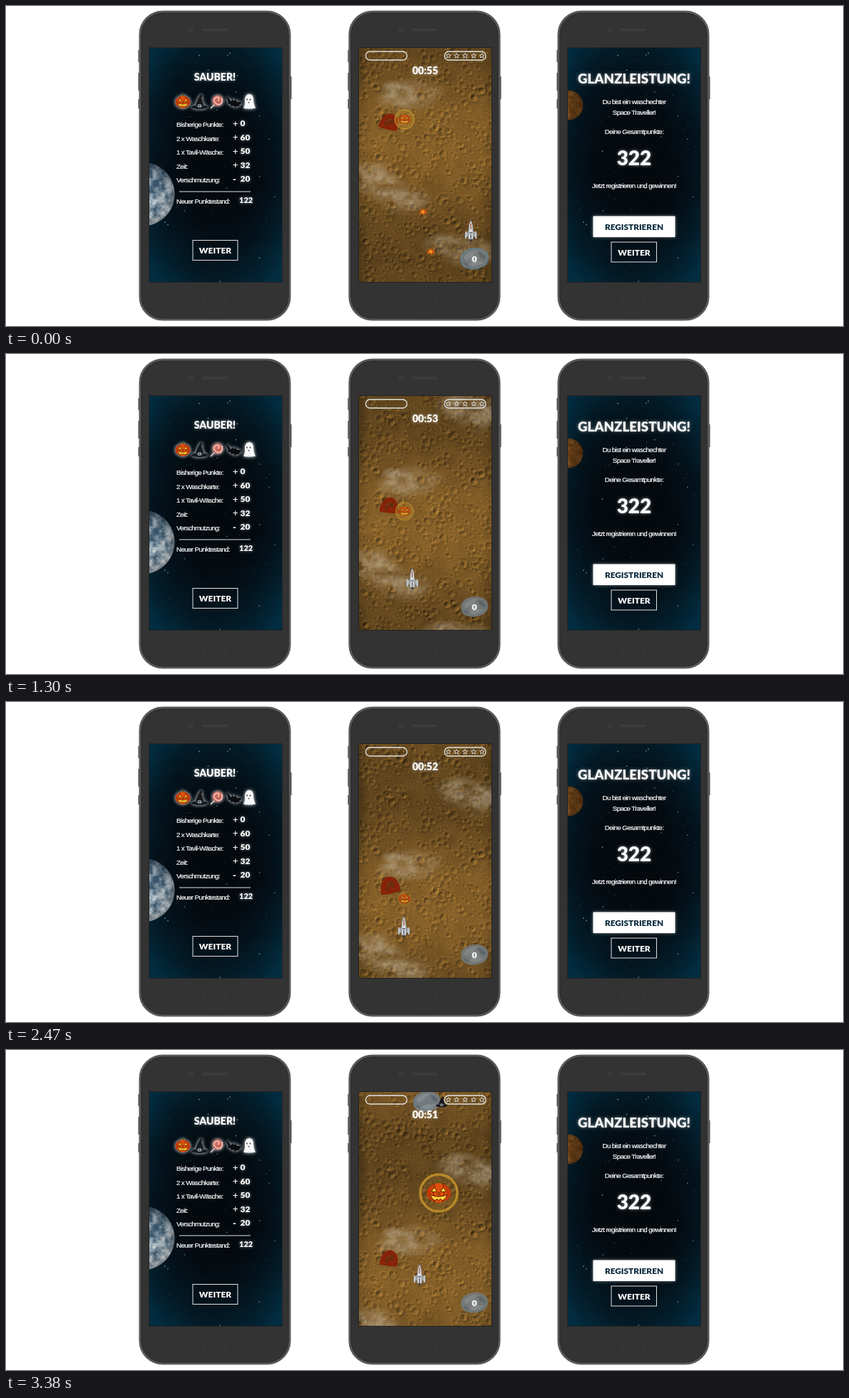
These frames come from a looping animation (1174 px wide and 450 px high, 3510 ms). An HTML page with a canvas:

```html
<!DOCTYPE html>
<html lang="de">
<head>
<meta charset="utf-8">
<title>Weltraumspiel</title>
<style>
html, body { margin: 0; width: 100%; height: 100%; overflow: hidden; background: #fff; }
#stage { position: relative; width: 1174px; height: 450px; overflow: hidden; }
#stage > svg, #stage canvas, .screen { position: absolute; left: 0; top: 0; }
#stage .screen { top: 59px; width: 186px; height: 329px; overflow: hidden; background: #04141f; }
.head { font-family: Lato, "Open Sans", sans-serif; font-weight: 900; fill: #fff; }
.copy { font-family: "Liberation Sans", Arial, sans-serif; font-size: 9.8px; letter-spacing: -.65px; fill: #fff; stroke: #fff; stroke-width: .2px; }
.mid { text-anchor: middle; }
.glow { filter: drop-shadow(0 0 2px rgba(255,255,255,.5)); }
.line { fill: none; stroke: #dfe3e2; }
</style>
</head>
<body>
<div id="stage">
  <svg width="1174" height="450">
    <defs>
      <g id="phone">
        <path d="M187 62v17M187 94v25M187 131v13M399 99v32" stroke="#4a4a4c" stroke-width="3"/>
        <rect x="188" y="8" width="210" height="433" rx="32" fill="#333" stroke="#58585a" stroke-width="3"/>
        <rect x="190" y="10" width="206" height="429" rx="30" fill="none" stroke="#2b2b2b"/>
        <path d="M276 32.5h35M277 34.5h34" stroke="#5a5a5a" stroke-dasharray="1 1.5"/>
        <circle cx="259.500" cy="33.500" r="2.500" fill="none" stroke="#575757" stroke-dasharray="1 1"/>
        <circle cx="293" cy="414.500" r="16" fill="none" stroke="#4c4c4c" stroke-dasharray="1 2"/>
        <rect x="200" y="58" width="188" height="331" fill="#232323"/>
      </g>
    </defs>
    <use href="#phone"/><use href="#phone" x="294"/><use href="#phone" x="587"/>
  </svg>

  <div class="screen" style="left:201px"><canvas id="skyA"></canvas><canvas id="moon"></canvas></div>
  <div class="screen" style="left:495px"><canvas id="ground"></canvas><canvas id="clouds"></canvas><canvas id="newCloud"></canvas></div>
  <div class="screen" style="left:788px"><canvas id="skyB"></canvas><canvas id="planet"></canvas></div>

  <svg width="1174" height="450">
    <defs>
      <clipPath id="view"><rect x="495" y="59" width="186" height="329"/></clipPath>
      <g id="pumpkin">
        <path d="M-1.500-7.500L-1-10.500L2-10L1.500-7z" fill="#4d5a16"/>
        <ellipse rx="10.500" ry="8.500" fill="#c23a0a"/>
        <ellipse rx="7" ry="8.700" fill="#dc4f0c"/>
        <path d="M-3.500-8Q-6 0-3.500 8M3.500-8Q6 0 3.500 8" fill="none" stroke="#8c2404" stroke-width=".8"/>
        <path d="M-6.500-1L-4-5L-1.500-1zM6.500-1L4-5L1.500-1zM-1 1.500L0-.5L1 1.500zM-7.500 1.500Q0 5 7.500 1.500Q5 7 2.500 6.500L1.500 5L0 6.800L-1.500 5L-2.500 6.500Q-5 7-7.500 1.500z" fill="#ffd83c" stroke="#5a1402" stroke-width=".6"/>
      </g>
      <g id="hat" fill="#15191c">
        <ellipse cy="7" rx="11" ry="3"/>
        <path d="M-6.500 6.500L-2-5L2-11L4.500-8L2.500-6.500L6.500 6.500Q0 9-6.500 6.500z"/>
        <path d="M-5.500 3.500Q0 6 5.500 3.500V6Q0 8.500-5.500 6z" fill="#343a3f"/>
        <rect x="-1.700" y="4" width="3.500" height="3" fill="none" stroke="#c7ccd0"/>
      </g>
      <g id="rock">
        <path d="M-19 2Q-19-7-11-11Q-2-16 9-13Q19-10 19-1Q19 9 10 12Q-1 17-11 13Q-18 11-19 2z" fill="#727a7e"/>
        <path d="M-15-2Q-8-12 5-11Q-2-3-12 3zM-8 8Q3 2 13 5Q6 12-4 11z" fill="#949c9f" opacity=".5"/>
        <path d="M5-9Q15-7 16 0Q12 2 8-2zM-16 5Q-10 6-8 10Q-13 11-16 5z" fill="#4e5b66" opacity=".6"/>
      </g>
      <g id="leaf">
        <path d="M-6-1L-3-2L-4-5L-1-3L1-6L2-3L6-4L4 0L6 2L2 2L1 5L-1 2L-5 4L-4 1z" fill="#cf5a10"/>
        <path d="M-3-1L0-3L2 0L0 2z" fill="#f2a227"/>
      </g>
      <path id="star" class="line" stroke-width=".9" d="M0-3.500L1-1.200L3.400-1.100L1.600.5L2.200 2.900L0 1.600L-2.200 2.900L-1.600.5L-3.400-1.100L-1-1.200z"/>
    </defs>

    <!-- score screen -->
    <text class="head mid glow" x="293" y="105" font-size="14">SAUBER!</text>
    <g class="glow">
      <g class="glow">
        <use href="#pumpkin" x="248" y="135"/>
        <use href="#hat" x="271.500" y="135"/>
        <g transform="translate(297 133)">
          <path d="M-2 3L-10 11" stroke="#e5ddd7" stroke-width="1.500"/>
          <circle r="7.500" fill="#c9665d"/>
          <path d="M0 0Q4-3 0-5Q-6-4-5 1Q-2 7 4 5Q8 0 5-4" fill="none" stroke="#f3c9b9" stroke-width="1.600"/>
        </g>
        <path d="M309 128Q313 129 315 134L318 131L319 133L321 133L322 131L324 135Q327 134 331 136Q327 138 327 141Q323 140 322 143Q319 139 316 141Q315 137 312 138Q312 133 309 128z" fill="#0b0d10"/>
        <path d="M333 144Q336 138 335 132Q336 124 341 124Q347 124 347 132Q347 138 350 144Q346 143 345 145Q343 143 341 145Q339 143 337 145Q336 143 333 144z" fill="#f5f7f8"/>
        <path d="M338 130.500v2M342.500 130.500v2M340.500 135v1.500" stroke="#30383d" stroke-width="1.500"/>
      </g>
    </g>
    <g id="scores"></g>
    <path d="M243 261h100" stroke="#dfe6e8" stroke-width="1.200"/>
    <rect class="line" x="262" y="329.500" width="63" height="28"/>
    <text class="head mid" x="293.500" y="348" font-size="12">WEITER</text>

    <!-- game screen -->
    <g clip-path="url(#view)">
      <g id="stain">
        <path d="M-13 11Q-13 2-9-5Q-5-11 1-11Q8-10 11-4Q14 3 13 11Q0 13-13 11z" fill="#862208"/>
        <path d="M-3-3Q2-7 6-3L7 2L4 5L2 2L-2 4L-3 9L-6 6z" fill="#5c3212" opacity=".8"/>
        <path d="M-2-3h5M-4 0h3M2 6h5M-9 8h4" stroke="#9c3412" stroke-width="1.200"/>
      </g>
      <use id="leafA" href="#leaf"/><use id="leafB" href="#leaf"/>
      <g id="ship">
        <path d="M-2.500 11L0 16L2.500 11z" fill="#30343a"/>
        <path d="M-2.500-1L-8.500 5V10L-2.500 8zM2.500-1L8.500 5V10L2.500 8z" fill="#a9adae" stroke="#55595d" stroke-width=".7"/>
        <path d="M-7 1V11M7 1V11" stroke="#c9cccc" stroke-width="1.800"/>
        <path d="M0-15Q3.500-9 3.200 1L3.500 12H-3.500L-3.200 1Q-3.500-9 0-15z" fill="#d8dada" stroke="#63676b" stroke-width=".7"/>
        <path d="M0-10V-2" stroke="#a8513f" stroke-width="1.300"/>
        <path d="M-2 3H2M0 5V11" stroke="#545b62" stroke-width="1.400"/>
      </g>
      <g id="bonus">
        <circle id="ring" fill="#d9a733" stroke="#d29c2c"/>
        <use id="treat" href="#pumpkin"/>
      </g>
      <g id="arrival"><use href="#rock" x="590"/><use href="#hat" transform="translate(611 1) scale(.75)"/></g>
      <use href="#rock" x="657" y="355" opacity=".9"/>
      <path id="aura" d="M638 357Q638 348 646 344Q655 339 666 342Q676 345 676 354Q676 364 667 367Q656 372 646 368Q639 366 638 357z" fill="none" stroke="#4d8fb5" stroke-width="1.300" stroke-dasharray="2 1"/>
      <text class="head mid glow" x="657" y="360" font-size="12">0</text>
      <rect class="line" x="504.500" y="64" width="58" height="12" rx="6" stroke-width="1.300"/>
      <rect class="line" x="615" y="64" width="58" height="12" rx="6" stroke-width="1.300"/>
      <use href="#star" x="620.500" y="70"/><use href="#star" x="632" y="70"/><use href="#star" x="644" y="70"/><use href="#star" x="656" y="70"/><use href="#star" x="667.500" y="70"/>
      <text id="clock" class="head mid glow" x="588" y="95.500" font-size="14"></text>
    </g>

    <!-- result screen -->
    <text class="head mid glow" x="881" y="109" font-size="18.700">GLANZLEISTUNG!</text>
    <g class="copy mid">
      <text x="881" y="138">Du bist ein waschechter</text>
      <text x="881" y="153">Space Traveller!</text>
      <text x="881" y="180">Deine Gesamtpunkte:</text>
      <text x="881" y="256">Jetzt registrieren und gewinnen!</text>
    </g>
    <text class="head mid glow" x="881" y="224" font-size="28">322</text>
    <rect class="glow" x="823.500" y="295.500" width="115" height="29.500" fill="#fff"/>
    <text class="head mid" x="881" y="314.500" font-size="11.800" style="fill:#0b2a3d">REGISTRIEREN</text>
    <rect class="line" x="849" y="332" width="63.500" height="28"/>
    <text class="head mid" x="881" y="351" font-size="12">WEITER</text>
  </svg>
</div>

<script>
const $ = id => document.getElementById(id);
const clamp = (v, a = 0, b = 1) => Math.min(b, Math.max(a, v));
const mix = (a, b, k) => a + (b - a) * k;

const hash = (x, y) => {
  const v = Math.sin(x * 127.1 + y * 311.7) * 43758.5453;
  return v - Math.floor(v);
};
function noise(x, y) {
  const i = Math.floor(x), j = Math.floor(y);
  const ease = f => f * f * (3 - 2 * f);
  const u = ease(x - i), v = ease(y - j);
  return mix(mix(hash(i, j), hash(i + 1, j), u), mix(hash(i, j + 1), hash(i + 1, j + 1), u), v);
}
const cloudy = (x, y) => .5 * noise(x, y) + .3 * noise(x * 2.1, y * 2.1) + .2 * noise(x * 4.3, y * 4.3);

function random(seed) {
  return () => (seed = (seed * 16807) % 2147483647) / 2147483647;
}

// Fill a canvas pixel by pixel with shade(x, y) -> [r, g, b, alpha]
function paint(id, w, h, shade) {
  const c = $(id), g = c.getContext("2d");
  c.width = w; c.height = h;
  const img = g.createImageData(w, h);
  for (let y = 0, p = 0; y < h; y++)
    for (let x = 0; x < w; x++, p += 4) {
      const [r, gr, b, a = 1] = shade(x, y);
      img.data.set([r, gr, b, a * 255], p);
    }
  g.putImageData(img, 0, 0);
  return g;
}

const W = 186, H = 329, DROP = 150, RISE = 70;

function sky(id) {
  const g = paint(id, W, H, (x, y) => {
    const d = Math.hypot((x - 93) / 125, (y - 160) / 205);
    const k = clamp(d ** 3 * .95 + .2 * (cloudy(x / 40, y / 40) - .5));
    return [mix(4, 2, k), mix(9, 44, k), mix(14, 64, k)];
  });
  const rnd = random(77);
  for (let i = 0; i < 170; i++) {
    const bright = rnd() ** 5, s = bright > .6 ? 1.5 : 1;
    g.fillStyle = `rgba(150,195,215,${.12 + .65 * bright})`;
    g.fillRect(rnd() * W, rnd() * H, s, s);
  }
}

// tilt brightens the lower right rim
function globe(id, cx, cy, r, dark, light, size, tilt) {
  paint(id, 60, 260, (x, y) => {
    const dx = x - cx, dy = y - cy, d = Math.hypot(dx, dy);
    const grain = (cloudy(x / size + 5, y / size) - .5) * 1.6;
    const n = clamp(.3 + grain + tilt * (dy * .8 + dx * .4) / r);
    const limb = .6 + .45 * Math.sqrt(clamp(1 - d * d / r / r));
    return [0, 1, 2].map(i => mix(dark[i], light[i], n) * limb).concat(clamp(r + .5 - d));
  });
}

function ground() {
  const h = H + DROP, map = new Float32Array(W * h), rnd = random(4321);
  for (let i = 0; i < 1500; i++) {
    const cx = rnd() * W, cy = rnd() * h, r = 1.5 + 4 * rnd() ** 2, m = r * 1.6;
    for (let y = Math.max(0, Math.ceil(cy - m)); y < Math.min(h, cy + m); y++)
      for (let x = Math.max(0, Math.ceil(cx - m)); x < Math.min(W, cx + m); x++) {
        const d = Math.hypot(x - cx, y - cy) / r;
        map[y * W + x] += r * (.25 * Math.exp(-(((d - 1) / .35) ** 2)) - .35 * Math.max(0, 1 - d * d));
      }
  }
  const at = (x, y) => map[clamp(y, 0, h - 1) * W + clamp(x, 0, W - 1)];
  paint("ground", W, h, (x, y) => {
    const slope = at(x + 1, y + 1) - at(x - 1, y - 1);
    const band = .17 * Math.cos((y - DROP - 131) / H * 2 * Math.PI);
    const edge = -.16 * clamp(1 - Math.min(x, W - x) / 14);
    const v = clamp(1 + .1 * slope + band + edge + .22 * (cloudy(x / 16, y / 16) - .5)
      + .12 * (hash(x, y) - .5), .45, 1.5);
    return [114 * v, 82 * v, 35 * v];
  });
}

// Puffs are [x, y, rx, ry]
function clouds(id, puffs) {
  paint(id, W, H + RISE, (x, y) => {
    let body = 0;
    for (const [cx, cy, rx, ry] of puffs)
      body = Math.max(body, 1 - Math.hypot((x - cx) / rx, (y - RISE - cy) / ry));
    const a = body <= 0 ? 0 : clamp(body * 1.7) * clamp((cloudy(x / 15, y / 12) - .15) * 1.6);
    return [190, 175, 150, a * .62];
  });
}

function scores() {
  const rows = [
    ["Bisherige Punkte:", "+", "0", 170], ["2 x Waschkarte:", "+", "60", 189.5],
    ["1 x Tavil-Wäsche:", "+", "50", 209], ["Zeit:", "+", "32", 228.5],
    ["Verschmutzung:", "-", "20", 248], ["Neuer Punktestand:", "", "122", 277.5]
  ];
  $("scores").innerHTML = rows.map(([label, sign, n, y]) => `
    <text class="copy" x="239" y="${y}">${label}</text>
    <text class="${sign === "-" ? "head" : "copy"}" x="318" y="${y - .5}" style="font-size:13px">${sign}</text>
    <text class="head glow" x="${sign ? 328.5 : 327}" y="${y - 1}" font-size="${sign ? 12 : 11}">${n}</text>`).join("");
}

// Straight-line interpolation through [time, ...values]
function along(keys, t) {
  let i = 0;
  while (i < keys.length - 2 && t >= keys[i + 1][0]) i++;
  const a = keys[i], b = keys[i + 1], k = clamp((t - a[0]) / (b[0] - a[0]));
  return a.slice(1).map((v, n) => mix(v, b[n + 1], k));
}
const place = (id, x, y, s = 1, rot = 0) =>
  $(id).setAttribute("transform", `translate(${x} ${y}) rotate(${rot}) scale(${s})`);
const show = (id, on) => $(id).style.display = on ? "" : "none";

const LOOP = 3510, STEP = 130, CAUGHT = 2990;
const shipPath = [[0, 652], [390, 632], [910, 586], [1560, 559], [2470, 558], [3120, 575.5], [3380, 580]];
const flight = [[CAUGHT, 562, 301, 1.15], [3120, 572, 297, 1.5], [3250, 590, 250, 1.55], [3380, 607, 201, 1.6]];

function render(t) {
  $("ground").style.top = -DROP + t * .0385 + "px";
  $("clouds").style.top = $("newCloud").style.top = -RISE + t * .0425 + "px";
  show("newCloud", t >= 1170);

  place("stain", 537.5, 162 + t * .0385, 1 - .06 * Math.sin(t / 500), 14 * Math.cos(t / 248));
  place("leafA", 585 + t * .041, 290 + t * .128, 1, t * .15);
  place("leafB", 596 + t * .025, 346 + t * .128, 1, t * .15);
  place("ship", along(shipPath, t)[0], 316);

  const pulse = .5 + .5 * Math.cos(t / 1560 * 2 * Math.PI);
  const free = t < CAUGHT;
  const [x, y, s] = free ? [559, 159.5 + t * .0475, .8] : along(flight, t);
  place("bonus", x, y);
  place("treat", 0, 0, s);
  const ring = $("ring");
  ring.setAttribute("r", free ? 9 + 4.5 * pulse : along([[CAUGHT, 14], [3120, 22], [3380, 26]], t)[0]);
  ring.setAttribute("stroke-width", free ? 1.6 : along([[CAUGHT, 1.6], [3120, 2], [3380, 3.5]], t)[0]);
  ring.setAttribute("stroke-opacity", free ? .2 + .45 * pulse : .75);
  ring.setAttribute("fill-opacity", free ? .05 + .25 * pulse : .12);
  $("treat").style.opacity = free ? .72 : 1;

  show("arrival", t >= 3250);
  place("arrival", 0, 72 + (t - 3380) * .0475);
  show("aura", t < 780);
  $("clock").textContent = "00:" + (55 - Math.floor((t + 740) / 1000));
}

sky("skyA");
sky("skyB");
globe("moon", -10, 205, 45, [58, 86, 108], [222, 228, 230], 9, .5);
globe("planet", 0, 80, 21, [84, 50, 16], [150, 98, 44], 8, .1);
ground();
clouds("clouds", [
  [80, 63, 42, 24], [54, 72, 34, 20], [48, 56, 20, 12],
  [18, 180, 38, 26], [35, 196, 38, 24], [64, 212, 40, 24],
  [122, 276, 38, 18], [155, 287, 44, 25]
]);
clouds("newCloud", [[140, 30 - RISE, 36, 22], [168, 41 - RISE, 36, 28]]);
scores();

let last = -1;
function tick() {
  const t = Math.floor(performance.now() % LOOP / STEP) * STEP;
  if (t !== last) render(last = t);
  requestAnimationFrame(tick);
}
tick();
</script>
</body>
</html>
```
